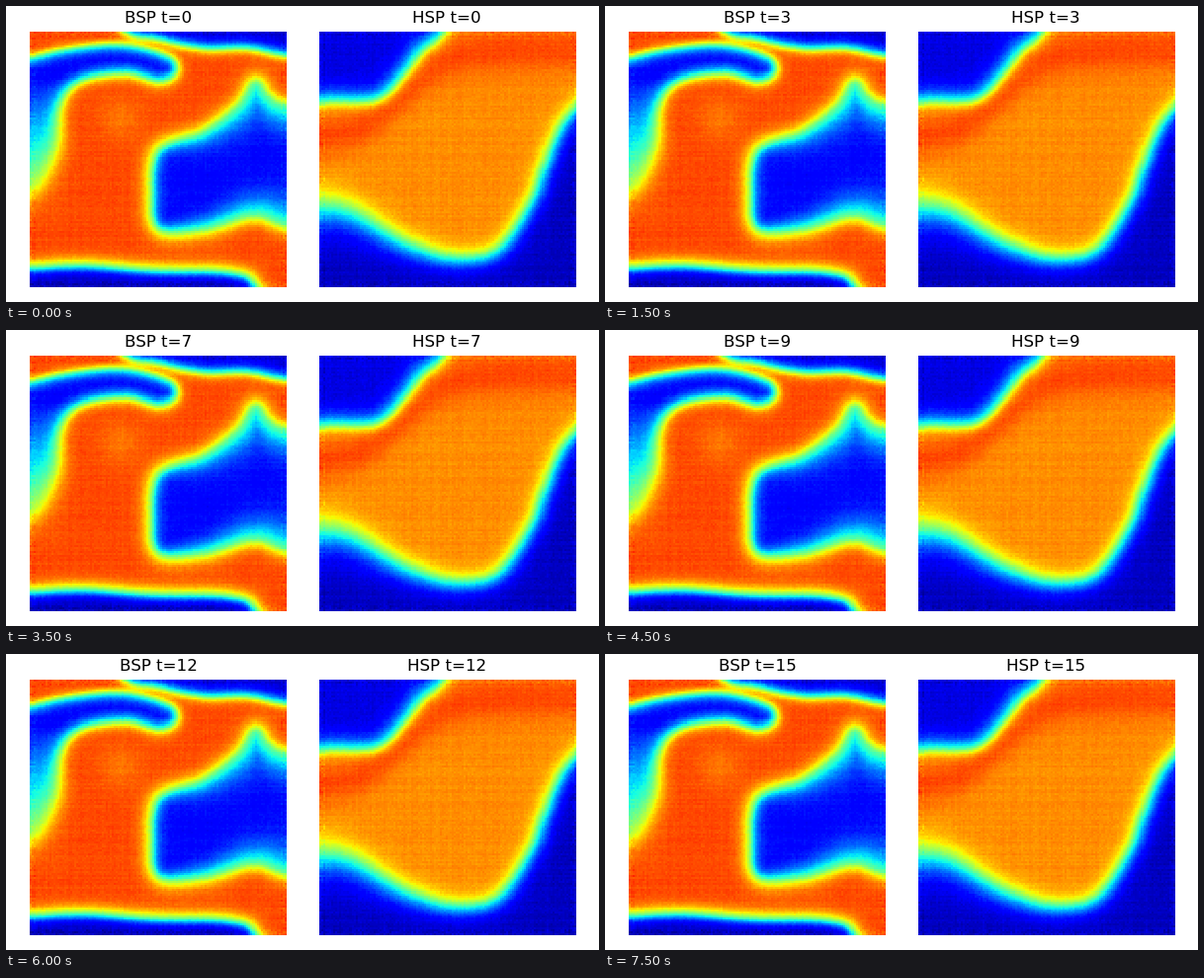
An HTML page with a canvas that plays this animation: 600 px wide and 300 px high, repeating every 8 s.

```html
<!DOCTYPE html>
<html>
<head>
<meta charset="utf-8">
<style>
  html, body { margin: 0; width: 100%; height: 100%; overflow: hidden; background: #fff; }
  canvas { position: absolute; top: 26px; width: 260px; height: 259px; image-rendering: pixelated; }
  svg { position: absolute; left: 0; top: 0; }
  text { font: 16.67px "DejaVu Sans", sans-serif; }
</style>
</head>
<body>
<svg width="600" height="300"><text y="17"></text><text y="17"></text></svg>
<script>
const N = 128, STEP = 500, COUNT = 16;
const clamp = v => Math.min(1, Math.max(0, v));
const bell = t => Math.exp(-t * t);

// Each cold region has a few edge points in stage pixels, its own value,
// and the fade widths on the hot and cold side of its edge.
const panels = [
  {
    name: 'BSP', x: 24, middle: 154.4,
    hot: (x, y) => .835 - .05 * bell(Math.hypot(x - 116, y - 115) / 22),
    regions: [
      { cold: () => .07, fade: () => [6, 8],
        edge: [[110, -40], [118, 22], [155, 34], [200, 43], [245, 43], [290, 51], [400, 60], [400, -40]] },
      { cold: y => .11 + .45 * clamp((y - 70) / 125),
        fade: (x, y) => [6 + .05 * (y - 50), 8 + .04 * (y - 50)],
        edge: [[-40, 68], [24, 53], [70, 43], [120, 40], [165, 52], [172, 67], [155, 76],
               [120, 68], [75, 76], [55, 100], [50, 150], [24, 195], [-40, 205]] },
      { cold: () => .12, fade: x => [11, 7 + .14 * Math.max(0, x - 149)],
        edge: [[360, 108], [284, 101], [265, 92], [252, 78], [235, 102], [200, 128], [155, 147],
               [148, 190], [155, 226], [200, 226], [250, 212], [284, 222], [360, 240]] },
      { cold: () => .055, fade: () => [9, 7],
        edge: [[-40, 266], [24, 265], [80, 263], [150, 268], [225, 270], [252, 284], [262, 340], [-40, 340]] }
    ]
  },
  {
    name: 'HSP', x: 317, middle: 446.3,
    hot: (x, y) => .76 + .075 * bell((y - 45 - 88 / (1 + Math.exp((x - 400) / 22))) / 22),
    regions: [
      { cold: () => .085, fade: () => [8, 13],
        edge: [[250, 95], [330, 95], [375, 93], [402, 69], [420, 45], [442, 25], [480, -40], [250, -40]] },
      { cold: () => .055,
        fade: x => { const w = 11 + 15 * Math.exp((317 - x) / 70); return [w * .85, w]; },
        edge: [[640, 60], [573, 108], [546, 160], [531, 200], [497, 247], [450, 255],
               [400, 239], [350, 211], [317, 205], [250, 205], [250, 350], [640, 350]] }
    ]
  }
];

// Closed Catmull-Rom curve through the points.
function smooth(pts) {
  const out = [], n = pts.length;
  pts.forEach((b, i) => {
    const a = pts[(i + n - 1) % n], c = pts[(i + 1) % n], d = pts[(i + 2) % n];
    for (let t = 0; t < 1; t += .125)
      out.push([0, 1].map(k => .5 * (2 * b[k] + (c[k] - a[k]) * t
        + (2 * a[k] - 5 * b[k] + 4 * c[k] - d[k]) * t * t
        + (3 * b[k] - a[k] - 3 * c[k] + d[k]) * t ** 3)));
  });
  return out;
}

// Distance to the closed line, positive inside it.
function depth(line, x, y) {
  let inside = false, best = Infinity, a = line[line.length - 1];
  for (const b of line) {
    const dx = b[0] - a[0], dy = b[1] - a[1];
    const t = clamp(((x - a[0]) * dx + (y - a[1]) * dy) / (dx * dx + dy * dy));
    best = Math.min(best, (x - a[0] - dx * t) ** 2 + (y - a[1] - dy * t) ** 2);
    if ((a[1] > y) !== (b[1] > y) && x < a[0] + dx * (y - a[1]) / dy) inside = !inside;
    a = b;
  }
  return inside ? Math.sqrt(best) : -Math.sqrt(best);
}

// Repeatable noise in -1..1.
function noise(a, b, seed) {
  let h = Math.imul(a + 17, 374761393) ^ Math.imul(b + 29, 668265263) ^ Math.imul(seed + 5, 1274126177);
  h = Math.imul(h ^ h >>> 13, 1103515245);
  h = Math.imul(h ^ h >>> 15, 2246822519);
  return ((h ^ h >>> 16) >>> 0) / 2147483648 - 1;
}

function buildField(p, seed) {
  const lines = p.regions.map(r => smooth(r.edge));
  const field = new Float32Array(N * N);
  for (let j = 0; j < N; j++) for (let i = 0; i < N; i++) {
    const x = p.x + (i + .5) * 260 / N, y = 26 + (j + .5) * 259 / N;
    let v = p.hot(x, y);
    p.regions.forEach((r, k) => {
      const d = depth(lines[k], x, y), w = r.fade(x, y)[d > 0 ? 1 : 0];
      v += (r.cold(y) - v) * (.5 + .5 * Math.tanh(d / w));
    });
    const rim = Math.min(i, j, N - 1 - i, N - 1 - j) < 3 ? 2 : 1;
    field[j * N + i] = v + rim * (.011 * noise(i, j, seed)
      + .006 * noise(i, 0, seed + 2) + .007 * noise(0, j, seed + 4));
  }
  return field;
}

function jet(v) {
  const r = v < .89 ? (v - .35) / .31 : 1 - (v - .89) / .22;
  const g = v < .5 ? (v - .125) / .25 : (.91 - v) / .27;
  const b = v < .2 ? .5 + v / .22 : (.65 - v) / .31;
  return [r, g, b].map(c => 255 * clamp(c));
}

const labels = document.querySelectorAll('text');
panels.forEach((p, k) => {
  const canvas = document.createElement('canvas');
  canvas.width = canvas.height = N;
  canvas.style.left = p.x + 'px';
  document.body.append(canvas);
  p.ctx = canvas.getContext('2d');
  p.image = p.ctx.createImageData(N, N);
  p.field = buildField(p, 10 * k + 1);
});

function draw(step) {
  panels.forEach((p, k) => {
    const label = labels[k];
    label.textContent = `${p.name} t=${step}`;
    label.setAttribute('x', Math.floor(p.middle - label.getComputedTextLength() / 2));
    const seed = 100 + 40 * k + step;
    for (let n = 0; n < N * N; n++) {
      const v = p.field[n] + .005 * noise(n % N, n / N | 0, seed);
      p.image.data.set([...jet(v), 255], n * 4);
    }
    p.ctx.putImageData(p.image, 0, 0);
  });
}

let shown = -1;
function tick() {
  const step = Math.floor(performance.now() / STEP) % COUNT;
  if (step !== shown) draw(shown = step);
  requestAnimationFrame(tick);
}
tick();
</script>
</body>
</html>
```
